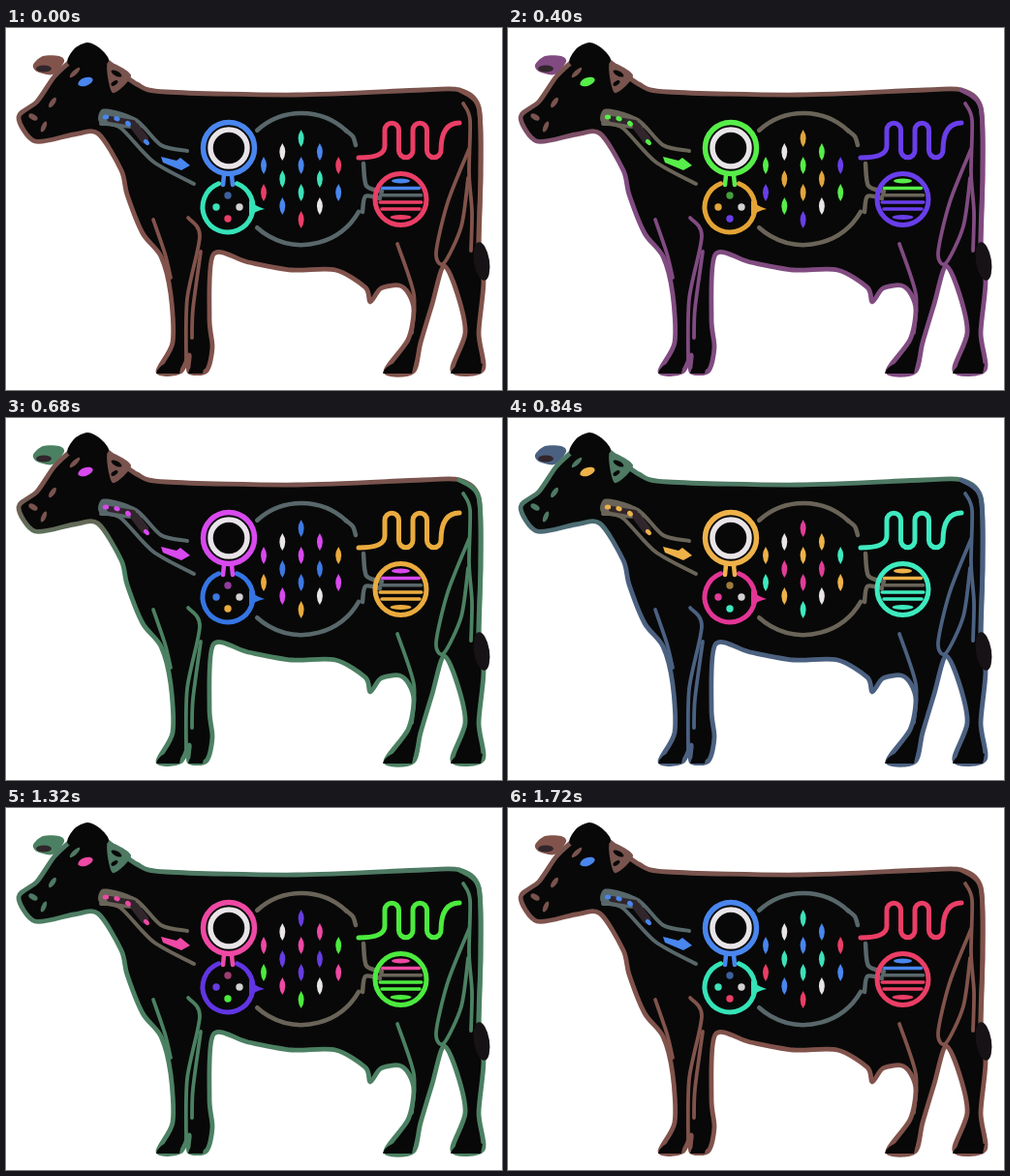
Write an HTML page with a canvas that moves like this. It is 512x374 px and loops after 1760 ms.

```html
<!DOCTYPE html>
<html lang="en">
<head>
<meta charset="utf-8">
<title>Cow digestion</title>
<style>
html, body { margin: 0; width: 100%; height: 100%; overflow: hidden; background: #fff; }
canvas { display: block; width: 512px; height: 374px; }
</style>
</head>
<body>
<canvas id="stage" width="512" height="374"></canvas>
<script>
const ctx = document.getElementById('stage').getContext('2d');
const LOOP = 1760, STEP = 40;
const TURN = 3 * 360 / 43; // degrees of hue per step
const INK = '#080808', PALE = '#e9e4e8', DARK = '#30262b';

// Each part turns through the hues and snaps to the nearest one of its palette.
const BRIGHT = [20, 38, 115, 165, 180, 218, 255, 292, 327, 346];
const PARTS = {
  gut:   { base: 346, s: 80, l: 58, hues: BRIGHT },
  food:  { base: 224, s: 83, l: 61, hues: BRIGHT },
  net:   { base: 160, s: 76, l: 55, hues: BRIGHT },
  leaf:  { base: 158, s: 73, l: 56, hues: BRIGHT },
  dim:   { base: 224, s: 45, l: 43, hues: BRIGHT },
  top:   { base: 8, s: 22, l: 39, hues: [8, 150] },
  low:   { base: 14, s: 26, l: 40, hues: [8, 146, 216, 300] },
  organ: { base: 190, s: 9, l: 38, hues: [40, 190] }
};

function gap(a, b) {
  const d = Math.abs(a - b) % 360;
  return Math.min(d, 360 - d);
}

function palette(step) {
  const out = {};
  for (const [name, { base, s, l, hues }] of Object.entries(PARTS)) {
    const h = base + TURN * step;
    const near = hues.reduce((a, b) => gap(b, h) < gap(a, h) ? b : a);
    out[name] = `hsl(${near}, ${s}%, ${l}%)`;
  }
  return out;
}

// Smooth curve through a few key points.
function curve(p, closed) {
  const n = p.length / 2, path = new Path2D();
  const at = i => {
    i = closed ? (i + n) % n : Math.max(0, Math.min(n - 1, i));
    return [p[2 * i], p[2 * i + 1]];
  };
  path.moveTo(p[0], p[1]);
  for (let i = 0; i < (closed ? n : n - 1); i++) {
    const [a, b, c, d] = [at(i - 1), at(i), at(i + 1), at(i + 2)];
    path.bezierCurveTo(b[0] + (c[0] - a[0]) / 7, b[1] + (c[1] - a[1]) / 7,
      c[0] - (d[0] - b[0]) / 7, c[1] - (d[1] - b[1]) / 7, c[0], c[1]);
  }
  if (closed) path.closePath();
  return path;
}

const BACK = [68,33, 84,18, 104,34, 135,58, 165,66, 300,69, 430,64, 468,64, 488,82, 490,150, 488,220];
const HIND_LEGS = [493,262, 488,315, 492,353, 461,354, 474,315, 466,275, 452,246,
  440,285, 428,325, 420,355, 392,355, 415,322, 421,292, 416,275];
const BELLY = [406,266, 387,269, 376,283, 371,268, 340,250, 295,250, 250,242, 214,234];
const FORE_LEGS = [210,300, 213,330, 207,354, 189,355, 189,338, 180,355, 157,355,
  172,325, 170,275, 160,236];
const HEAD = [141,212, 125,172, 119,147, 95,109, 70,110, 30,117, 13,92, 32,76, 50,50];

const body = curve([...BACK, ...HIND_LEGS, ...BELLY, ...FORE_LEGS, ...HEAD], true);
const rump = curve([468,64, 488,82, 490,150, 488,222]);
const poll = curve([64,37, 70,22, 84,15, 97,21, 106,34, 90,46], true);
const leftEar = curve([28,38, 38,29, 55,29, 60,35, 48,48, 32,45], true);
const rightEar = curve([105,36, 129,49, 110,67], true);
const folds = [
  [472,78, 479,95, 478,150, 481,190, 480,230],
  [478,125, 456,180, 444,232, 452,243, 470,205, 477,155],
  [404,223, 421,275, 419,315],
  [152,198, 164,233, 170,258],
  [188,196, 200,215, 187,280, 186,345],
  [201,231, 193,290, 192,320]
].map(p => curve(p));
const gullet = [
  [100,86, 134,95, 160,121, 187,127],
  [98,99, 118,103, 152,138, 194,161]
].map(p => curve(p));
const throat = curve([99,84, 120,87, 136,95, 138,104, 98,99], true);
const ducts = [
  [351,106, 358,112, 361,121],
  [369,140, 372,163, 388,169],
  [368,190, 371,174, 386,176]
].map(p => curve(p));
const spout = new Path2D('M251 178Q257 184 267 187Q257 189 251 195');
const arrow = new Path2D('M160 133L176 137L180 134L190 142L181 147L162 139Z');
const snake = coil(391, 14.5, 5);

// Upright runs joined by half circles, alternating top and bottom.
function coil(x, pitch, runs) {
  const p = new Path2D(), r = pitch / 2;
  p.moveTo(364, 134);
  p.quadraticCurveTo(391, 134, x, 122);
  for (let i = 0; i < runs - 1; i++) {
    const low = i % 2;
    p.arc(x + pitch * i + r, low ? 126.5 : 105.5, r, Math.PI, 0, low === 1);
  }
  p.quadraticCurveTo(x + pitch * (runs - 1), 98, 468, 98);
  return p;
}

function stroke(path, color, width) {
  ctx.strokeStyle = color;
  ctx.lineWidth = width;
  ctx.stroke(path);
}

function fill(path, color) {
  ctx.fillStyle = color;
  ctx.fill(path);
}

function oval(x, y, rx, ry, color, turn = 0) {
  const p = new Path2D();
  p.ellipse(x, y, rx, ry, turn, 0, 7);
  fill(p, color);
}

function ring(x, y, r, color, width, from = 0, to = 2 * Math.PI) {
  const p = new Path2D();
  p.arc(x, y, r, from, to);
  stroke(p, color, width);
}

function line(x1, y1, x2, y2, color, width) {
  const p = new Path2D();
  p.moveTo(x1, y1);
  p.lineTo(x2, y2);
  stroke(p, color, width);
}

function leaf(x, y, color) {
  fill(new Path2D(`M${x} ${y - 9}q6 9 0 18q-6 -9 0 -18`), color);
}

function hoof(x, w) {
  fill(new Path2D(`M${x} 357q2 -9 ${w * 0.6} -13l${w * 0.4} 3l-2 10z`), INK);
}

function drawCow(c) {
  const coat = ctx.createLinearGradient(0, 75, 0, 145);
  coat.addColorStop(0, c.top);
  coat.addColorStop(1, c.low);
  fill(leftEar, c.low);
  oval(39, 42, 8, 3.5, DARK);
  fill(body, INK);
  stroke(body, coat, 4.8);
  stroke(rump, c.low, 4.8);
  fill(rightEar, c.top);
  oval(114, 47, 6, 2.5, INK, 0.5);
  oval(112, 57, 4, 2, INK, -0.6);
  fill(poll, INK);
  hoof(155, 26);
  hoof(188, 17);
  hoof(389, 32);
  hoof(459, 33);
  folds.forEach(p => stroke(p, c.low, 3.8));
  oval(491, 241, 8, 20, '#171215', -0.15);
  oval(28, 92, 5, 2.8, c.top, 0.5);
  oval(39, 102, 2.4, 6, c.top, 0.4);
  oval(48, 77, 2.5, 6, c.top, 0.6);
  oval(71, 46, 2.3, 7, c.top, 0.8);
  oval(82, 55.5, 8, 4.2, c.food, -0.35);
}

function drawThroat(c) {
  fill(throat, c.organ);
  gullet.forEach(p => stroke(p, c.organ, 4));
  line(107, 94, 131, 98, DARK, 6);
  line(133, 102, 143, 115, DARK, 9);
  for (let i = 0; i < 3; i++) {
    oval(103 + 11.5 * i, 92 + 1.7 * i * i, 3.2, 2.5, c.food, 0.4 * i);
  }
  oval(145, 118, 3.5, 2.3, c.food, 0.8);
  fill(arrow, c.food);
}

function drawRumen(c) {
  ring(305, 156, 68, c.organ, 4.5, -2.31, -0.82);
  ring(305, 156, 68, c.organ, 4.5, 0.52, 2.31);
  ducts.forEach(p => stroke(p, c.organ, 4.5));
  // A diamond of leaves, column by column.
  const kinds = { f: c.food, g: c.gut, l: c.leaf, p: PALE };
  ['fg', 'plf', 'lflg', 'flp', 'gf'].forEach((column, i) => {
    [...column].forEach((k, j) => {
      leaf(266 + 19.3 * i, 114 + 14 * Math.abs(i - 2) + 28 * j, kinds[k]);
    });
  });
}

function drawStomachs(c) {
  ring(229, 185, 26, c.net, 5, -1.2, 4.34);
  fill(spout, c.net);
  ring(230, 124, 26.5, c.food, 5.5);
  ring(230, 124, 19, PALE, 5.5);
  for (const side of [-1, 1]) {
    line(229 + 4 * side, 152, 229 + 5 * side, 162, c.food, 4.5);
  }
  [c.gut, c.leaf, c.dim, '#d2d0d3'].forEach((color, i) => {
    const a = (i + 1) * Math.PI / 2;
    oval(229 + 12 * Math.cos(a), 185 + 12 * Math.sin(a), 3.7, 3.7, color);
  });
}

function drawGut(c) {
  stroke(snake, c.gut, 5);
  const x = 407.5, y = 177, r = 26.5;
  ring(x, y, r, c.gut, 5);
  [c.food, c.organ, c.gut, c.gut].forEach((color, i) => {
    const dy = 7.2 * i - 11.5;
    const half = Math.sqrt(r * r - dy * dy) - 5;
    line(x - half, y + dy, x + half, y + dy, color, 3.5);
  });
  oval(x, y - 19, 9.5, 2.5, c.food);
  oval(x, y + 18.5, 11, 2.5, c.gut);
}

function frame(now) {
  const colors = palette(Math.floor((now % LOOP) / STEP));
  ctx.fillStyle = '#fff';
  ctx.fillRect(0, 0, 512, 374);
  ctx.lineCap = ctx.lineJoin = 'round';
  drawCow(colors);
  drawThroat(colors);
  drawRumen(colors);
  drawStomachs(colors);
  drawGut(colors);
}

const start = performance.now();
function tick() {
  frame(performance.now() - start);
  requestAnimationFrame(tick);
}
tick();
</script>
</body>
</html>
```
